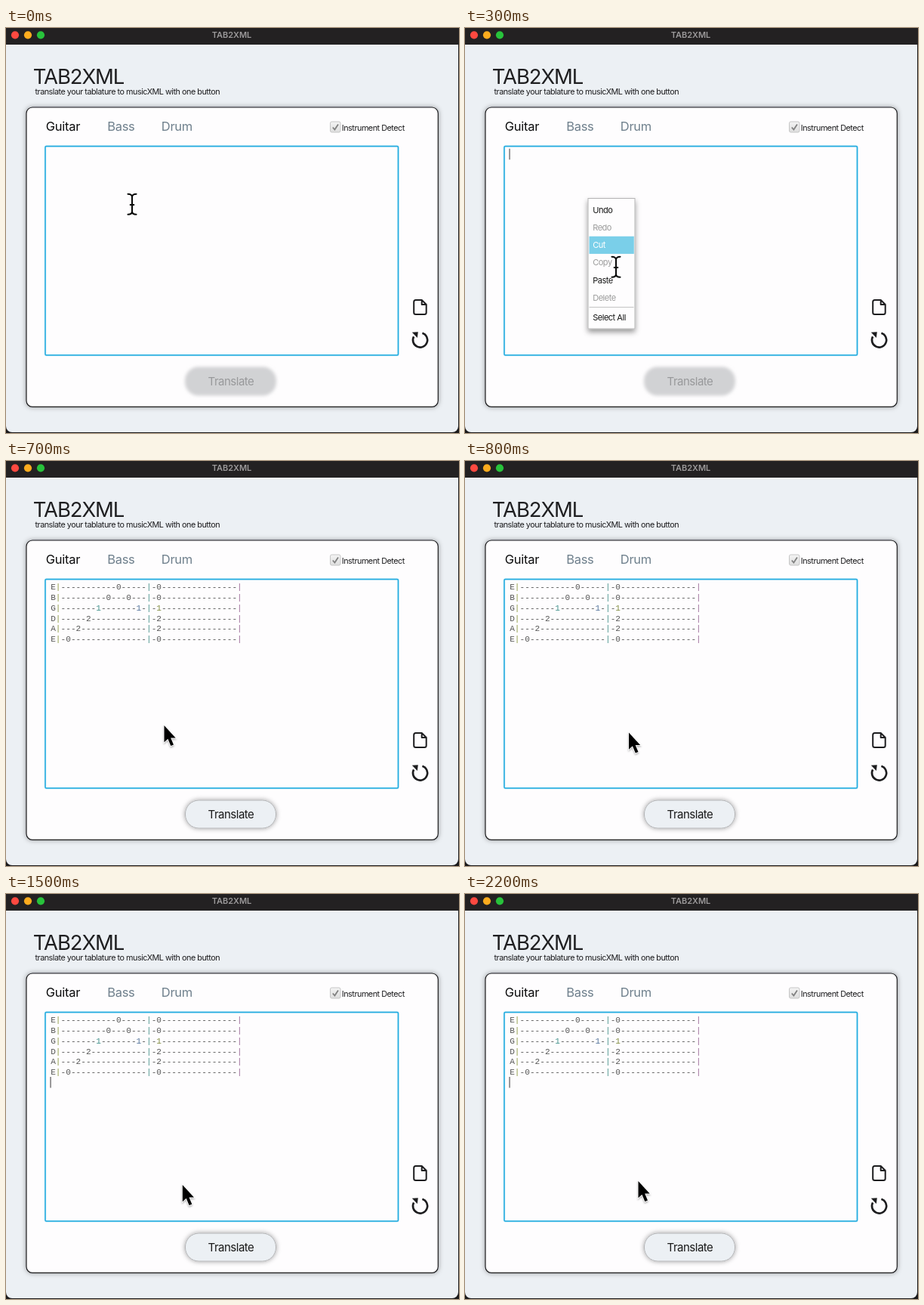
An HTML page that plays this animation: 600x536 px, repeating every 2300 ms.

```html
<!DOCTYPE html>
<html lang="en">
<head>
<meta charset="utf-8">
<title>TAB2XML</title>
<style>
  html, body { margin: 0; width: 100%; height: 100%; overflow: hidden; background: #1b1a1b; }
  svg { display: block; width: 100%; height: 100%; }
  text { font-family: Inter, "Liberation Sans", sans-serif; font-optical-sizing: none; white-space: pre; }
  .small { font-size: 10.8px; letter-spacing: -.48px; fill: #1c1c1e; }
  .tab { font-size: 16.5px; letter-spacing: -.28px; fill: #6e7f8c; }
  .item { font-size: 11px; letter-spacing: -.48px; }
  .label { font-size: 15px; letter-spacing: -.5px; }
  .mono { font: 11.1px "Liberation Mono", "DejaVu Sans Mono", monospace; }
  .icon { fill: none; stroke: #1d1d1f; stroke-width: 2; stroke-linejoin: round; }
  .beam path { fill: none; stroke-linecap: round; }
</style>
</head>
<body>
<svg viewBox="0 0 600 536" preserveAspectRatio="none">
  <defs>
    <filter id="soft" x="-20%" y="-30%" width="140%" height="160%"><feGaussianBlur stdDeviation="2"/></filter>
    <filter id="shade" x="-20%" y="-20%" width="140%" height="150%">
      <feDropShadow dx="0" dy="0" stdDeviation="3" flood-color="#000" flood-opacity=".38"/>
    </filter>
    <filter id="drop" x="-30%" y="-20%" width="160%" height="150%">
      <feDropShadow dx="0" dy="4" stdDeviation="3.5" flood-color="#000" flood-opacity=".4"/>
    </filter>
    <filter id="lift" x="-50%" y="-50%" width="200%" height="200%">
      <feDropShadow dx="0" dy="1.5" stdDeviation="1.3" flood-color="#000" flood-opacity=".35"/>
    </filter>
    <linearGradient id="box" x2="0" y2="1">
      <stop stop-color="#f4f4f4"/><stop offset="1" stop-color="#dedede"/>
    </linearGradient>
  </defs>

  <!-- window -->
  <rect width="599" height="535" rx="8" fill="#ecf0f4"/>
  <rect width="600" height="22" fill="#232122"/>
  <circle cx="12" cy="9.3" r="5.1" fill="#fe4940"/>
  <circle cx="29" cy="9.3" r="5.1" fill="#fdac1e"/>
  <circle cx="46" cy="9.3" r="5.1" fill="#28c23b"/>
  <text x="299" y="13" text-anchor="middle" font-size="11" font-weight="600" fill="#9c9a9b">TAB2XML</text>
  <text x="35.7" y="74" font-size="27.5" letter-spacing="-1.1" fill="#1f1f21">TAB2XML</text>
  <text x="38.5" y="88" class="small">translate your tablature to musicXML with one button</text>

  <!-- card -->
  <rect x="27" y="105" width="545.3" height="396.3" rx="8" fill="#fefdfe" stroke="#1d1d1f" stroke-width="1.2" filter="url(#shade)"/>
  <text x="52.8" y="136" class="tab" style="fill:#0c0c0d">Guitar</text>
  <text x="134.2" y="136" class="tab">Bass</text>
  <text x="205.8" y="136" class="tab">Drum</text>
  <rect x="429.5" y="124" width="13.5" height="14" rx="2" fill="url(#box)" stroke="#c6c6c6"/>
  <path d="M432.8 131.5L435.4 134.5L440 127.5" fill="none" stroke="#808080" stroke-width="1.8"/>
  <text x="444.8" y="136" class="small">Instrument Detect</text>
  <rect x="52" y="156.5" width="467.5" height="276.5" rx="1.5" fill="#fefdfe" stroke="#bfe6f5" stroke-width="2.4"/>
  <rect x="52" y="156.5" width="467.5" height="276.5" rx="1.5" fill="none" stroke="#22ace0" stroke-width="1.5"/>

  <path class="icon" d="M542.7 360H550.7L556.7 366V376.5Q556.7 379 554.2 379H542.7Q540.2 379 540.2 376.5V362.5Q540.2 360 542.7 360ZM550.7 360V366H556.7"/>
  <path class="icon" style="stroke-width:2.6" d="M551.4 403.8A9.6 9.6 0 1 1 540.1 408.4"/>
  <path d="M537.8 402.8L545.8 402.2L544.8 410Z" fill="#1d1d1f"/>

  <g id="off">
    <rect x="237" y="448.5" width="121" height="38" rx="18" fill="#d1d2d4" filter="url(#soft)"/>
    <text x="267.6" y="473" class="label" fill="#98999b">Translate</text>
  </g>
  <g id="on">
    <rect x="237.5" y="449" width="120" height="37" rx="18" fill="#ecf0f4" stroke="#b2b3b5" filter="url(#shade)"/>
    <text x="267.6" y="473" class="label" fill="#1a1a1a">Translate</text>
  </g>

  <g id="score"></g>
  <rect id="caret" x="58.5" width="1.1" height="14.5" fill="#4a4a4a"/>

  <g id="menu">
    <rect x="163" y="225.5" width="62" height="172.5" fill="#fefdfe" stroke="#b4b4b4" filter="url(#drop)"/>
    <rect id="bar" x="164.5" width="59.3" height="23.2"/>
    <path d="M164.5 369.5H223.5" stroke="#c4c4c4"/>
  </g>

  <g id="beam" class="beam"></g>
  <g id="arrow" filter="url(#lift)">
    <path d="M.5 0V22.2L5.4 17.8L9.3 27L13 25.4L9.2 16.5H15.7Z" fill="#050505" stroke="#fff" stroke-width="1.4" paint-order="stroke"/>
  </g>
</svg>

<script>
const LOOP = 2300, STEP = 100;
const MENU = [200, 700], PASTED = 700, CARET_BACK = 1000;
const $ = id => document.getElementById(id);

function add(parent, tag, attrs, content = '') {
  const el = document.createElementNS('http://www.w3.org/2000/svg', tag);
  for (const k in attrs) el.setAttribute(k, attrs[k]);
  el.textContent = content;
  return parent.appendChild(el);
}

// Tablature: string name, { column: fret }
const strings = [
  ['E', { 13: 0, 21: 0 }],
  ['B', { 11: 0, 15: 0, 21: 0 }],
  ['G', { 9: 1, 17: 1, 21: 1 }],
  ['D', { 7: 2, 21: 2 }],
  ['A', { 5: 2, 21: 2 }],
  ['E', { 3: 0, 21: 0 }]
];
const barTint = { 1: '#8f9a45', 19: '#4c958f', 37: '#9c6c98' };
const oneTint = { 9: '#3f8f8a', 17: '#51719a', 21: '#7f8a3c' };

strings.forEach(([name, frets], row) => {
  const line = add($('score'), 'text', { x: 59.2, y: 170.4 + row * 13.75, class: 'mono' });
  for (let col = 0; col < 38; col++) {
    const ch = col === 0 ? name : col in barTint ? '|' : String(frets[col] ?? '-');
    const fill = ch === '|' ? barTint[col] : ch === '1' ? oneTint[col] : '#555';
    add(line, 'tspan', { fill }, ch);
  }
});

// Context menu
const entries = ['Undo', 'Redo', 'Cut', 'Copy', 'Paste', 'Delete', 'Select All'];
const enabled = [0, 4, 6];
const rowMid = i => 241 + 23.15 * i + (i === 6 ? 2.6 : 0);
const items = entries.map((name, i) =>
  add($('menu'), 'text', { x: 169.2, y: rowMid(i) + 4, class: 'item' }, name));

function highlight(row) {
  items.forEach((el, i) => el.setAttribute('fill',
    i === row ? '#fff' : enabled.includes(i) ? '#161616' : '#9b9b9b'));
  show('bar', row >= 0);
  if (row < 0) return;
  $('bar').setAttribute('y', rowMid(row) - 11.6);
  $('bar').setAttribute('fill', enabled.includes(row) ? '#0690c8' : '#7acfe9');
}

// Text pointer: white halo under a black line
const beamPath = 'M-5.5 -13.3C-2 -13.3 0 -12 0 -9V9.5C0 12.5 -2 13.8 -5.5 13.8' +
  'M5.5 -13.3C2 -13.3 0 -12 0 -9M0 9.5C0 12.5 2 13.8 5.5 13.8M-2.3 1H2.3';
add($('beam'), 'path', { d: beamPath, stroke: '#fff', 'stroke-width': 4.2 });
add($('beam'), 'path', { d: beamPath, stroke: '#0a0a0a', 'stroke-width': 2.1 });

// Pointer path: time, x, y
const path = [
  [0, 167, 233], [100, 167, 233], [200, 183, 272], [300, 200, 316],
  [400, 204, 339], [500, 205.5, 346], [600, 206, 347], [700, 209, 350],
  [800, 216.5, 359.5], [1000, 231, 381], [1100, 233.3, 385],
  [1900, 233.3, 385], [2200, 229, 380], [LOOP, 229, 380]
];

function pointer(t) {
  const i = path.findIndex(p => p[0] > t);
  const [a, b] = [path[i - 1], path[i]];
  const k = (t - a[0]) / (b[0] - a[0]);
  return [1, 2].map(n => a[n] + (b[n] - a[n]) * k);
}

function show(id, on) {
  $(id).style.display = on ? '' : 'none';
}

function draw(now) {
  const t = Math.floor((now % LOOP) / STEP) * STEP;
  const pasted = t >= PASTED;
  show('off', !pasted);
  show('on', pasted);
  show('score', pasted);
  show('menu', t >= MENU[0] && t < MENU[1]);
  highlight(t < 300 ? -1 : t < 400 ? 2 : 4);
  show('caret', pasted ? t >= CARET_BACK : t >= 100);
  $('caret').setAttribute('y', pasted ? 242 : 159.7);
  show('beam', !pasted);
  show('arrow', pasted);
  $(pasted ? 'arrow' : 'beam').setAttribute('transform', `translate(${pointer(t)})`);
}

const start = performance.now();
function tick() {
  draw(performance.now() - start);
  requestAnimationFrame(tick);
}
tick();
</script>
</body>
</html>
```
